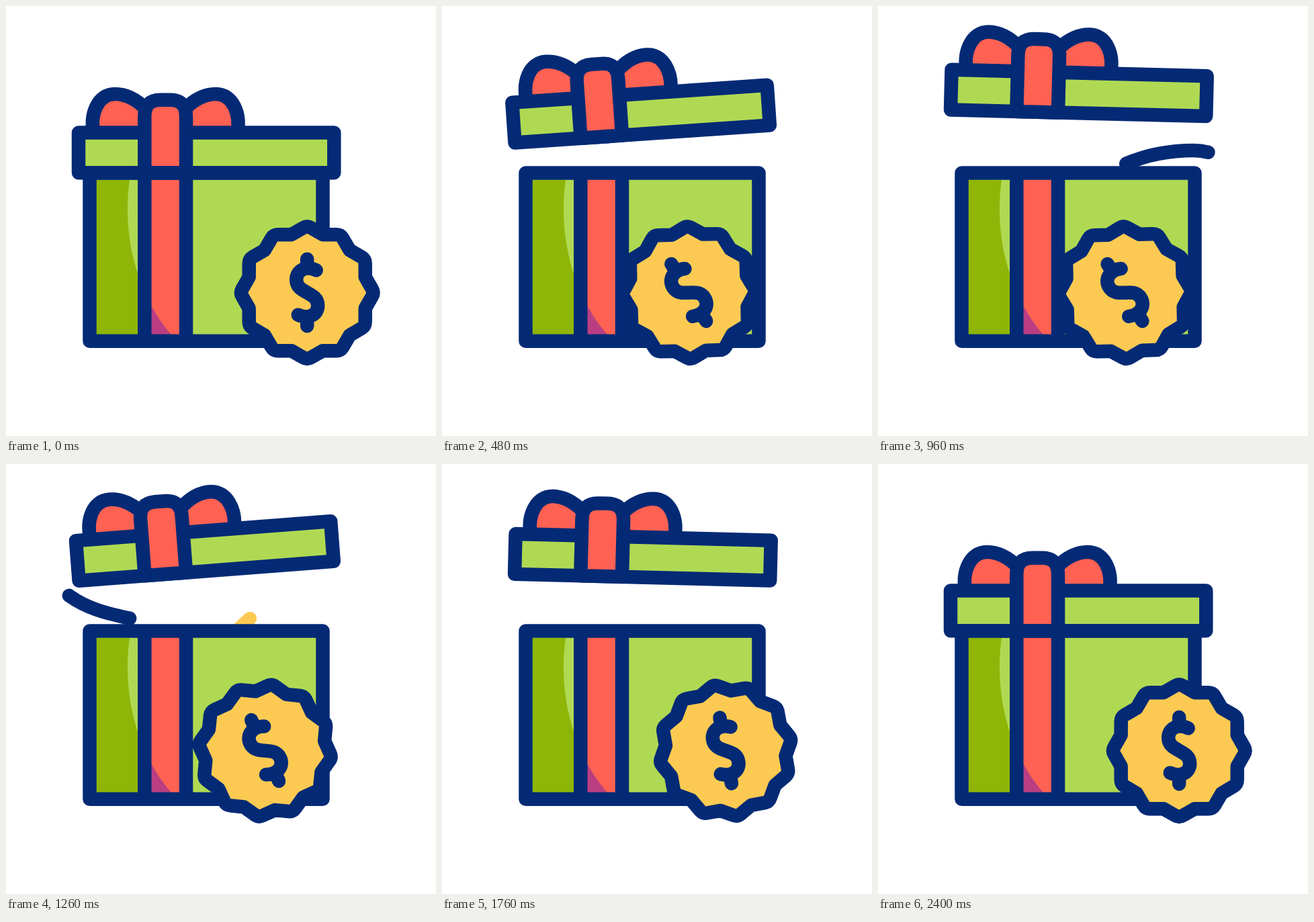
Recreate the animation shown at these times as an HTML page. Size 640 px wide and 640 px high, loop 2.42 s.

```html
<!DOCTYPE html>
<html lang="en">
<head>
<meta charset="utf-8">
<title>Gift box</title>
<style>
  html, body { margin: 0; height: 100%; overflow: hidden; background: #fff; }
  svg { display: block; width: 100%; height: 100%; }
  .line { stroke: #042a75; stroke-width: 20.5; stroke-linecap: round; stroke-linejoin: round; fill: none; }
  .green { fill: #b0d953; }
  .red { fill: #ff6152; }
  .yellow { fill: #fcca52; }
  .gold { stroke: #fcca52; }
</style>
</head>
<body>
<svg viewBox="0 0 640 640">
  <g id="streamers">
    <path class="line gold" pathLength="1" data-start="491" d="M255 282C240 258 205 217 165 215C120 213 80 240 57 290"/>
    <path class="line" pathLength="1" data-start="740" d="M300 290C340 230 420 215 470 215C520 216 550 250 562 290"/>
    <path class="line" pathLength="1" data-start="1014" d="M255 280C240 255 220 238 185 230C150 222 122 216 94 196C76 182 60 170 52 150"/>
    <path class="line gold" pathLength="1" data-start="1167" d="M300 290L362 231C420 176 510 180 561 230"/>
  </g>

  <g id="box">
    <path class="green" d="M124 248H471V499H124Z"/>
    <path class="red" d="M206 248H268V499H206Z"/>
    <clipPath id="ribbon"><path d="M206 248H268V499H206Z"/></clipPath>
    <path id="shade" fill="#8fb508" d="M124 259H184C172 342 196 432 246 489V499H124Z"/>
    <use href="#shade" clip-path="url(#ribbon)" style="--shade:#bb3e82"/>
    <path class="line" d="M124.5 248.5H471.5V498.7H124.5ZM206.3 248.5V498.7M268 248.5V498.7"/>
  </g>

  <g id="lid">
    <g class="red">
      <path id="loop" class="line" style="fill:#ff6152" d="M130 188C125 160 137 131 162 131C178 131 194 139 208 153V188"/>
      <use href="#loop" transform="translate(474.4) scale(-1 1)"/>
    </g>
    <path class="line" style="fill:#b0d953" d="M108 188.5H488.3V248.3H108Z"/>
    <path class="line" style="fill:#ff6152" d="M206.3 248.3V164Q206.3 139.8 230 139.8H244.5Q268 139.8 268 164V248.3Z"/>
  </g>

  <g id="badge">
    <path id="seal" class="line" style="fill:#fcca52"/>
    <path class="line" d="M0 -50V-38M0 38V49.5M13.5 -33.5C-2 -41 -16 -33 -16 -19.3C-16 2 16 -2 16 19C16 33 2 40 -13.5 33"/>
  </g>
</svg>
<script>
  const LOOP = 2420, END = 2400;
  const $ = id => document.getElementById(id);
  const clamp = v => Math.min(1, Math.max(0, v));
  const smooth = v => (v = clamp(v), v * v * (3 - 2 * v));

  // Eased value through [time, value] pairs
  function tween(t, keys) {
    let value = keys[0][1];
    for (let i = 1; i < keys.length; i++) {
      const [t0, v0] = keys[i - 1], [t1, v1] = keys[i];
      if (t >= t0) value = v0 + (v1 - v0) * smooth((t - t0) / (t1 - t0));
    }
    return value;
  }

  // Twelve-pointed seal with softened peaks
  function sealPath() {
    const polar = (r, deg) => [r * Math.sin(deg * Math.PI / 180), -r * Math.cos(deg * Math.PI / 180)];
    const mix = (a, b) => a.map((v, i) => v + (b[i] - v) * 0.23);
    let d = '';
    for (let a = 0; a < 360; a += 30) {
      const peak = polar(99.8, a), before = polar(89.6, a - 15), after = polar(89.6, a + 15);
      d += `${a ? 'L' : 'M'}${mix(peak, before)}Q${peak} ${mix(peak, after)}L${after}`;
    }
    return d + 'Z';
  }
  $('seal').setAttribute('d', sealPath());

  // The shadow turns purple where it crosses the ribbon
  $('shade').removeAttribute('fill');
  $('shade').style.fill = 'var(--shade, #8fb508)';

  const streamers = [...$('streamers').children];

  function draw(t) {
    const m = Math.min(t, END - t);
    const rise = tween(m, [[0, 0], [800, -89]]);
    const tilt = tween(m, [[0, 0], [400, -5], [800, 5], [1200, -5]]);
    $('lid').setAttribute('transform', `translate(0 ${rise}) rotate(${tilt} 298 248)`);

    const roll = tween(t, [[0, 0], [600, 1], [END, 0]]);
    $('badge').setAttribute('transform', `translate(${448.2 - 90 * roll} 426.7) rotate(${-35 * roll})`);

    for (const s of streamers) {
      const p = (t - s.dataset.start) / 330;
      const head = clamp(p), tail = clamp(p - 0.39);
      s.style.display = head > 0 && tail < 1 ? '' : 'none';
      s.style.strokeDasharray = `${head - tail} 9`;
      s.style.strokeDashoffset = -tail;
    }
  }

  function frame() {
    draw(Math.min(performance.now() % LOOP, END));
    requestAnimationFrame(frame);
  }
  frame();
</script>
</body>
</html>
```
